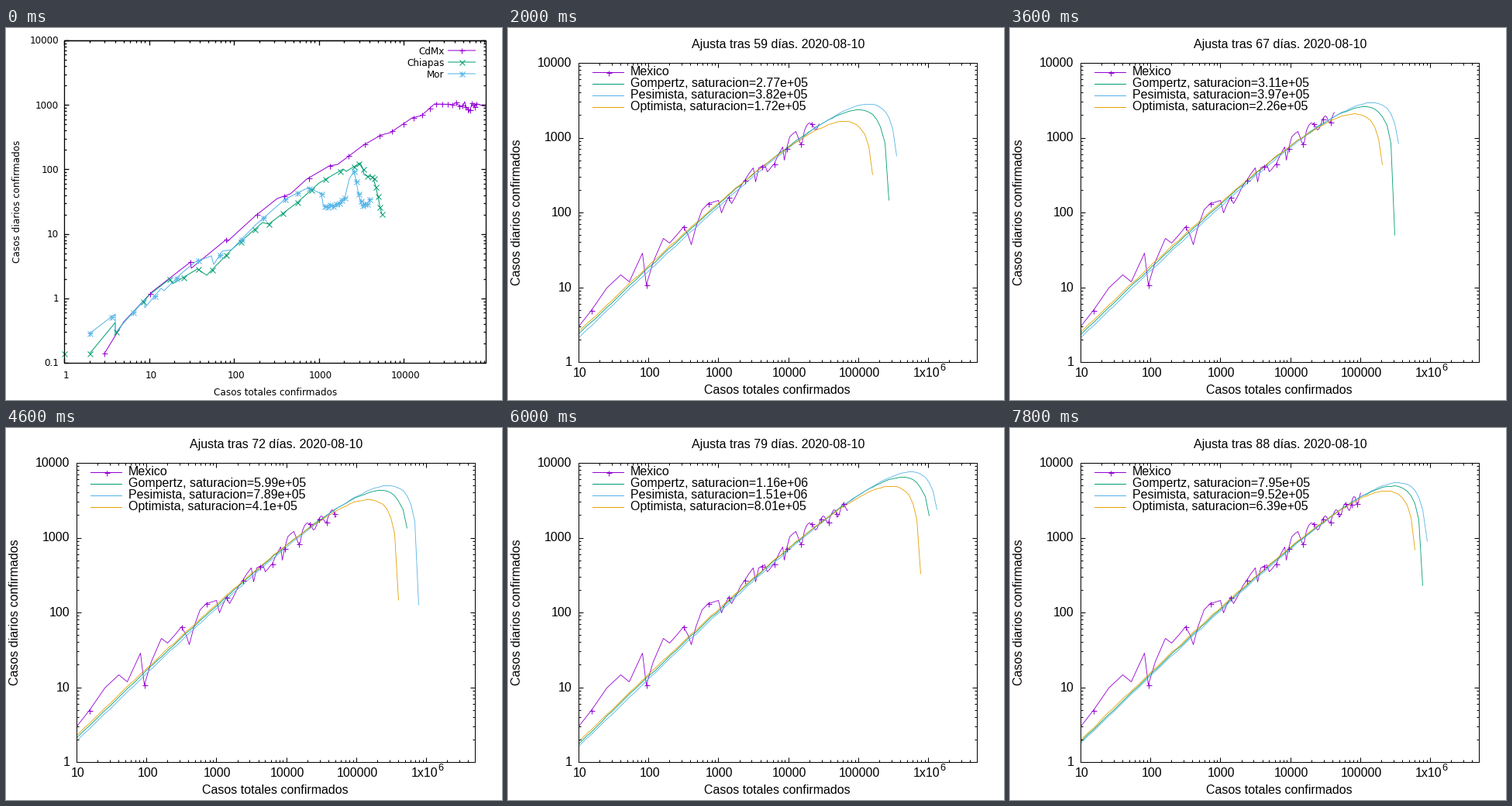
A matplotlib script for the animation above (8000 ms loop, 640 px wide and 480 px high).

```python
import numpy as np
import matplotlib.pyplot as plt
from matplotlib.animation import FuncAnimation
from matplotlib.patches import Rectangle

PX = 0.72  # points per pixel at 100 dpi
PURPLE, GREEN, BLUE, ORANGE = '#9400d3', '#009e73', '#56b4e9', '#e69f00'
XLABEL, YLABEL = 'Casos totales confirmados', 'Casos diarios confirmados'

fig = plt.figure(figsize=(6.4, 4.8), dpi=100, facecolor='white')
rng = np.random.default_rng(5)


def page():
    ax = fig.add_axes([0, 0, 1, 1])
    ax.set_xlim(0, 640)
    ax.set_ylim(480, 0)
    ax.axis('off')
    return ax


def put(ax, x, y, s, size, font, ha='center', rot=0):
    return ax.text(x, y, s, fontsize=size * PX, family=font, ha=ha, va='baseline',
                   rotation=rot, rotation_mode='anchor')


def path(ax, x, y, color, width=1, snap=False, z=2):
    return ax.plot(x, y, color=color, lw=width * PX, snap=snap, zorder=z,
                   solid_joinstyle='round', solid_capstyle='butt')[0]


def marks(ax, x, y, shape, color):
    for m in shape:
        dots, = ax.plot(x, y, ls='none', marker=m, color=color, ms=7 * PX, mew=PX, zorder=3)
    return dots


def log_ticks(start, step, end):
    """Positions and lengths of log ticks; decades are longer."""
    count = int(abs((end - start) / step)) + 1
    for n in range(count):
        for k in range(1, 10):
            p = start + step * (n + np.log10(k))
            if (p - end) * np.sign(step) < 0.5:
                yield np.floor(p) + 0.5, 6 if k == 1 else 3


def frame(ax, box, dx, dy, width):
    x0, y0, x1, y1 = box
    xs, ys = [x0, x1, x1, x0, x0, x1], [y0, y0, y1, y1, y0, y0]
    for p, t in log_ticks(x0, dx, x1):
        xs += [np.nan, p, p, np.nan, p, p]
        ys += [np.nan, y1, y1 - t, np.nan, y0, y0 + t]
    for p, t in log_ticks(y1, -dy, y0):
        xs += [np.nan, x0, x0 + t, np.nan, x1, x1 - t]
        ys += [np.nan, p, p, np.nan, p, p]
    path(ax, xs, ys, 'black', width, z=4)


# ---- opening chart: three states ----
intro = page()
SANS = 'DejaVu Sans'
frame(intro, (75.5, 16.5, 619.5, 432.5), 109.5, 83.2, 1.3)
for i in range(5):
    put(intro, 77.5 + 109.5 * i, 452, str(10 ** i), 12, SANS)
for i in range(6):
    put(intro, 68, 436.5 - 83.2 * i, f'{10.0 ** (i - 1):g}', 12, SANS, 'right')
put(intro, 348, 474, XLABEL, 12, SANS)
put(intro, 18, 223.5, YLABEL, 12, SANS, rot=90)


def state(row, name, keys, at, calm, jitter, shape, color):
    """Line through the keys, shaking past x = calm, with marks at the given x."""
    kx, ky = np.transpose(keys)
    x = np.union1d(kx, at)
    y = np.interp(x, kx, ky) + np.where(x > calm, rng.normal(0, jitter, x.size), 0)
    path(intro, x, y, color)
    marks(intro, at, np.interp(at, x, y), shape, color)
    y = 29 + 15 * row
    put(intro, 565.5, y + 5, name, 12, SANS, 'right')
    path(intro, [570, 606], [y, y], color)
    marks(intro, [588], [y], shape, color)


state(0, 'CdMx',
      [(127, 420), (152, 379), (189, 340), (220, 316), (238, 302), (239, 310), (284, 273),
       (285, 276), (321, 243), (350, 220), (367, 214), (388, 195), (417, 178), (428, 176),
       (460, 152), (484, 138), (496, 135), (524, 116), (536, 113), (553, 98), (592, 99),
       (597, 109), (602, 100), (619, 100)],
      619 - 492 * 0.88 ** np.arange(30), 570, 2, '+', PURPLE)
state(1, 'Chiapas',
      [(108, 420), (141, 380), (141.1, 394), (152, 380), (184, 345), (211, 324), (215, 330),
       (247, 311), (259, 319), (291, 286), (331, 251), (339, 253), (376, 225), (404, 200),
       (435, 182), (439, 185), (457, 174), (462, 190), (475, 194), (480, 222), (485, 241)],
      np.interp(np.arange(26), [0, 3, 16, 20, 25], [108, 211, 449, 472, 485]),
      458, 3, 'x', GREEN)
state(2, 'Mor',
      [(108, 394), (141, 369), (141.1, 394), (152, 380), (179, 350), (179.1, 361),
       (200, 336), (204, 339), (227, 316), (244, 302), (265, 294), (268, 305), (279, 288),
       (291, 286), (322, 254), (360, 221), (390, 206), (407, 214), (409, 230), (421, 229),
       (437, 218), (443, 189), (449, 183), (458, 228), (469, 221)],
      np.interp(np.arange(29), [0, 9, 12, 20, 21, 28], [108, 360, 407, 437, 449, 469]),
      408, 3, '+x', BLUE)
marks(intro, [75], [420], 'x', GREEN)

# ---- daily fits ----
fits = page()
ARIAL = 'Liberation Sans'
LEFT, TOP, RIGHT, BOTTOM = 91.5, 45.5, 605.5, 431.5
DECADES = np.log10(5e5)
DX, DY = (RIGHT - LEFT) / DECADES, (BOTTOM - TOP) / 4
frame(fits, (LEFT, TOP, RIGHT, BOTTOM), DX, DY, 1)
for i in range(5):
    put(fits, LEFT + 1 + DX * i, 450, str(10 ** (i + 1)), 16, ARIAL)
    put(fits, 82.5, 436 - DY * i, str(10 ** i), 16, ARIAL, 'right')
put(fits, 522.5, 450, '1x10', 16, ARIAL, 'left')
put(fits, 557.5, 442, '6', 12.8, ARIAL, 'left')
put(fits, 347.5, 472, XLABEL, 16, ARIAL)
put(fits, 16, 237.5, YLABEL, 16, ARIAL, rot=90)
title = put(fits, 348.5, 26, '', 16, ARIAL)

# New cases per day: peaks and dips at first, then growth with a weekly wave.
turns = {3: 2, 5: 5, 6: 10, 7: 15, 8: 12, 9: 29, 10: 11, 12: 46, 13: 39, 15: 65, 17: 38,
         19: 110, 20: 132, 22: 145, 23: 101, 25: 163, 26: 132, 32: 396, 33: 260, 34: 403,
         36: 442, 37: 353, 40: 450, 43: 764, 44: 511, 46: 1043, 48: 1239, 50: 835, 51: 852}
t = np.arange(3, 89)
early = np.exp(np.interp(t, list(turns), np.log(list(turns.values()))))
late = 1310 * np.exp(0.0284 * (t - 52)) * (1 + 0.16 * np.cos(2 * np.pi * (t - 5) / 7))
daily = np.where(t < 52, early, late)
total = 5 + np.cumsum(daily)

# day: saturation and its error (1e5), rate and its error (1e-2)
params = {54: (7.58, 6.885, 1.81, 0.40), 55: (16.5, 14.6, 1.55, 0.36),
          59: (2.77, 1.05, 2.336, 0.303), 63: (8.5, 3.9, 1.68, 0.20),
          67: (3.113, 0.855, 2.285, 0.25), 76: (8.3, 2.73, 1.685, 0.19),
          77: (12.1, 3.9, 1.50, 0.16), 83: (10.54, 2.898, 1.573, 0.14),
          88: (7.953, 1.565, 1.695, 0.125)}
days, table = list(params), np.array(list(params.values()))
grid = 10 ** (1 + DECADES * np.arange(100) / 99)


def to_px(n, d):
    x = LEFT + DX * (np.log10(n) - 1)
    y = BOTTOM - DY * np.log10(d)
    return np.floor(x) + 0.5, np.floor(y) + 0.5


clip = Rectangle((LEFT, TOP), RIGHT - LEFT, BOTTOM - TOP, fill=False, ec='none')
fits.add_patch(clip)
names = ['Mexico', 'Gompertz', 'Pesimista', 'Optimista']
lines, labels = [], []
for i, (name, color) in enumerate(zip(names, [PURPLE, GREEN, BLUE, ORANGE])):
    line = path(fits, [], [], color, 0.85)
    line.set_clip_path(clip)
    lines.append(line)
    y = 57.5 + 15 * i
    path(fits, [109, 150], [y, y], color)
    labels.append(put(fits, 158, 61 + 15 * i, name, 16, ARIAL, 'left'))
marks(fits, [129.5], [57.5], '+', PURPLE)
dots = marks(fits, [], [], '+', PURPLE)


def draw(i):
    intro.set_visible(i == 0)
    fits.set_visible(i > 0)
    if i == 0:
        return []
    day = 49 + i
    title.set_text(f'Ajusta tras {day} días. 2020-08-10')
    x, y = to_px(total[:day - 2], daily[:day - 2])
    lines[0].set_data(x, y)
    dots.set_data(x[2::5], y[2::5])
    sat, sat_err, rate, rate_err = (np.interp(day, days, c) for c in table.T)
    for k, side in ((1, 0), (2, 1), (3, -1)):
        cap = (sat + side * sat_err) * 1e5
        r = (rate - side * rate_err) / 100
        n = grid[grid < cap]
        lines[k].set_data(*to_px(n, r * n * np.log(cap / n)))
        labels[k].set_text(f'{names[k]}, saturacion={cap:.3g}')
    return []


anim = FuncAnimation(fig, draw, frames=40, interval=200, init_func=lambda: draw(0),
                     repeat=True, repeat_delay=0, blit=False)
plt.show()
```
